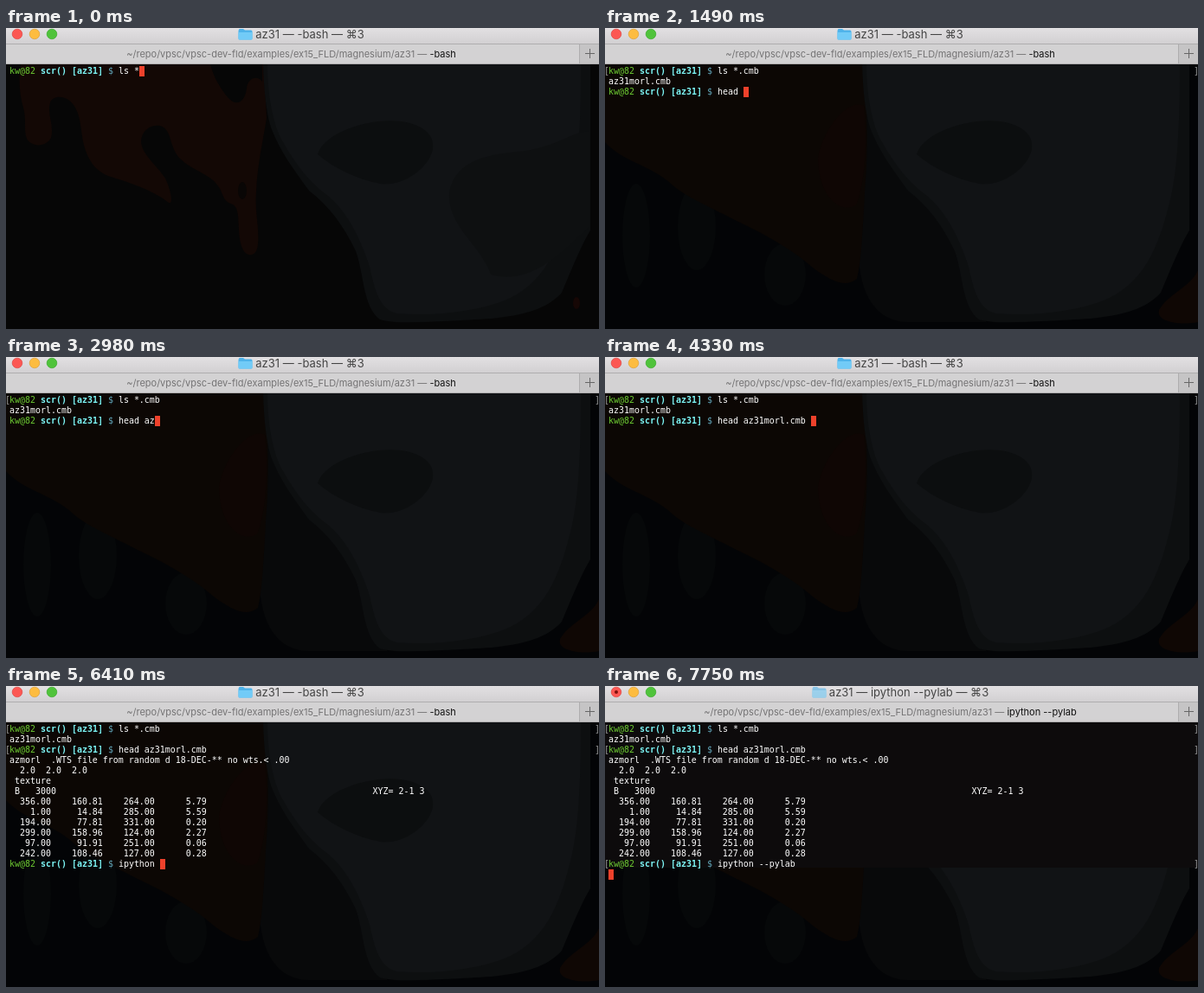
An HTML page for the animation above (8 s loop, 685 by 348 pixels).

```html
<!DOCTYPE html>
<html lang="en">
<head>
<meta charset="utf-8">
<title>Terminal session</title>
<style>
html, body { margin: 0; width: 100%; height: 100%; overflow: hidden; background: #060606; }
#stage { position: relative; width: 685px; height: 348px; overflow: hidden; }
svg { position: absolute; left: 0; top: 0; }
svg text { font-family: Inter, "Noto Sans", "DejaVu Sans", sans-serif; text-anchor: middle; white-space: pre; }
.row {
  position: absolute; left: -2px; height: 12px; margin: 0; white-space: pre;
  font: 9.966px/12px "DejaVu Sans Mono", monospace; color: #fff;
}
.user { color: #6cc932; }
.dir { color: #7df6f6; font-weight: bold; }
.sign { color: #63a9bd; }
.open, .close { color: #a2a2a2; }
.open { position: relative; left: 1px; }
.close { position: absolute; left: 682px; }
#cursor { position: absolute; width: 6px; height: 12px; background: #ee412b; }
</style>
</head>
<body>
<div id="stage">
  <svg width="685" height="348" viewBox="0 0 685 348">
    <defs>
      <linearGradient id="bar" x1="0" y1="0" x2="0" y2="1">
        <stop offset="0" stop-color="#e2e0e2"/>
        <stop offset="1" stop-color="#d2d0d2"/>
      </linearGradient>
      <g id="skull">
        <path fill="#0d0f10" d="M297 42C298 70 300 96 306 115C316 142 334 166 350 188C374 206 392 232 404 258C414 286 412 322 432 337C450 344 520 338 560 336C600 332 626 324 642 306C652 282 664 252 675 234V42Z"/>
        <path fill="#111315" d="M302 42C302 76 308 112 320 132C336 160 352 180 372 194C396 214 410 246 420 276C426 304 432 326 452 330C500 334 560 326 590 308C624 288 640 250 650 210C660 176 664 130 664 42Z"/>
        <path fill="#0c0e0f" d="M360 146C366 126 398 112 430 108C470 104 496 118 493 140C488 164 456 184 432 180C402 174 376 160 360 146Z"/>
      </g>
    </defs>

    <g id="wallA">
      <rect width="685" height="348" fill="#060606"/>
      <path fill="#130805" d="M17 42C14 62 16 78 20 92C24 106 20 118 24 128C30 138 46 138 52 127C56 112 47 100 51 86C55 76 73 78 80 92C88 106 86 126 92 142C98 158 106 166 118 171C140 178 168 186 188 202C194 204 190 186 184 174C174 158 158 148 156 132C156 118 168 111 178 113C192 117 188 136 200 150C216 166 236 168 246 184C252 194 250 200 262 204C272 210 266 232 272 252C276 266 290 266 291 250C293 232 287 212 289 190C290 160 297 130 301 104C300 76 298 60 297 42Z"/>
      <path fill="#060606" d="M236 42C240 58 248 70 256 80C266 92 276 86 278 70C279 58 290 54 296 62V42Z"/>
      <ellipse cx="273" cy="188" rx="5" ry="10" fill="#090605"/>
      <use href="#skull"/>
      <path fill="#0e1011" d="M512 190C520 150 560 146 600 142C640 136 656 118 674 120V230C650 250 610 300 560 285C548 250 510 230 512 190Z"/>
      <ellipse cx="659" cy="318" rx="4" ry="7" fill="#160705"/>
    </g>

    <g id="wallB">
      <rect width="685" height="348" fill="#030406"/>
      <g fill="#060809">
        <ellipse cx="36" cy="240" rx="16" ry="60"/>
        <ellipse cx="106" cy="230" rx="22" ry="50"/>
        <ellipse cx="208" cy="285" rx="24" ry="36"/>
      </g>
      <path fill="#08090a" d="M297 42C304 100 300 190 294 240C288 300 310 340 350 340H440L420 190Z"/>
      <path fill="#0c0704" d="M0 42H297C304 90 304 140 300 190C298 230 296 270 291 290C276 302 258 290 240 277C214 254 180 236 150 222C116 204 90 194 74 178C50 158 20 154 0 132Z"/>
      <path fill="#0f0604" d="M246 150C250 120 280 80 299 90C304 130 300 180 290 205C268 216 246 190 246 150Z"/>
      <use href="#skull"/>
      <path fill="#0f0704" d="M685 280C676 300 652 306 640 326C636 340 664 344 685 340Z"/>
    </g>
    <rect id="flat" y="42" width="685" height="168" fill="#0d0b0c"/>

    <rect width="685" height="18" fill="url(#bar)"/>
    <rect y="18" width="685" height="24" fill="#d3d2d3"/>
    <rect x="663" y="19" width="22" height="22" fill="#c5c4c5"/>
    <path d="M0 18.5H685M662.5 18V42M0 41.5H685" stroke="#aeadae" fill="none"/>
    <path d="M669 29.5H680M674.5 24V35" stroke="#666" fill="none"/>
    <g stroke-width=".7">
      <circle cx="13" cy="7" r="5.8" fill="#fc5753" stroke="#df4744"/>
      <circle cx="33" cy="7" r="5.8" fill="#fdbc40" stroke="#de9f34"/>
      <circle cx="53" cy="7" r="5.8" fill="#50c33b" stroke="#3aa92c"/>
    </g>
    <circle id="dirty" cx="13" cy="7" r="2" fill="#7d100c"/>
    <g id="folder">
      <path d="M1 2Q1 1 2 1H6L8 2.5H15Q16.500 2.500 16.500 4V12Q16.500 13.500 15 13.500H2Q.5 13.500 .5 12V3Z" fill="#4fb3ea"/>
      <path d="M.5 5H16.500V12Q16.500 13.500 15 13.500H2Q.5 13.500 .5 12Z" fill="#72cbf7"/>
    </g>
    <text id="title" x="351" y="12" font-size="13" fill="#444"></text>
    <text x="329.5" y="34" font-size="11" fill="#747374">~/repo/vpsc/vpsc-dev-fld/examples/ex15_FLD/magnesium/az31 — <tspan id="job" fill="#111"></tspan></text>
  </svg>
  <div id="term"></div>
  <div id="cursor"></div>
</div>
<script>
const LOOP = 8000, PROMPT_COLS = 21;
const $ = id => document.getElementById(id);

const FILE = 'az31morl.cmb';
const COMMANDS = ['ls *.cmb', 'head ' + FILE, 'ipython --pylab'];
const DATA = [
  [356, 160.81, 264, 5.79], [1, 14.84, 285, 5.59], [194, 77.81, 331, 0.2],
  [299, 158.96, 124, 2.27], [97, 91.91, 251, 0.06], [242, 108.46, 127, 0.28]
];
const OUTPUT = [
  [FILE],
  [
    'azmorl  .WTS file from random d 18-DEC-** no wts.< .00',
    '  2.0  2.0  2.0',
    ' texture',
    ' B   3000'.padEnd(70) + 'XYZ= 2-1 3',
    ...DATA.map(r => r.map((v, i) => v.toFixed(2).padStart(i ? 10 : 8)).join(''))
  ],
  []
];

// [start ms, commands already run, text typed so far]
const STEPS = [
  [0, 0, 'ls *'], [150, 0, 'ls *.c'], [300, 0, 'ls *.cmb'],
  [450, 1, ''], [1050, 1, 'h'], [1200, 1, 'hea'], [1350, 1, 'head'],
  [1490, 1, 'head '], [1640, 1, 'head a'], [1790, 1, 'head az'],
  [2090, 1, 'head az3'], [2240, 1, 'head az31'],
  [2830, 1, 'head az3'], [2980, 1, 'head az'],
  [3880, 1, 'head az3'], [4030, 1, 'head az31'], [4330, 1, `head ${FILE} `],
  [5080, 2, ''], [5820, 2, 'i'], [5970, 2, 'ip'], [6120, 2, 'ipyt'],
  [6260, 2, 'ipython'], [6410, 2, 'ipython '], [6560, 2, 'ipython --'],
  [6860, 2, 'ipython --p'], [7010, 2, 'ipython --py'],
  [7160, 2, 'ipython --pyla'], [7310, 2, 'ipython --pylab'],
  [7600, 3, ''], [7750, 3, '']
];

const span = (cls, text) => `<span class="${cls}">${text}</span>`;
const plain = text => ' ' + text.replace(/</g, '&lt;');

function prompt(text, done) {
  return (done ? span('open', '[') : ' ') + span('user', 'kw@82') + ' ' +
    span('dir', 'scr()') + ' ' + span('dir', '[az31]') + ' ' + span('sign', '$') + ' ' +
    text + (done ? span('close', ']') : '');
}

function show(id, on) { $(id).style.display = on ? '' : 'none'; }

function draw([start, run, typed]) {
  const rows = [];
  for (let i = 0; i < run; i++) rows.push(prompt(COMMANDS[i], true), ...OUTPUT[i].map(plain));
  const busy = run === COMMANDS.length;
  const cursorRow = rows.length;
  if (!busy) rows.push(prompt(typed, false));
  $('term').innerHTML = rows
    .map((r, i) => `<div class="row" style="top:${44 + 12 * i}px">${r}</div>`).join('');
  $('cursor').style.left = 4 + 6 * (busy ? 0 : PROMPT_COLS + typed.length) + 'px';
  $('cursor').style.top = 44 + 12 * cursorRow + 'px';

  const renamed = start >= 7750;
  const job = renamed ? 'ipython --pylab' : '-bash';
  $('title').textContent = `az31 — ${job} — ⌘3`;
  $('job').textContent = job;
  $('folder').setAttribute('transform', `translate(${renamed ? 239 : 268} 0)`);
  $('folder').setAttribute('opacity', renamed ? .6 : 1);
  show('dirty', renamed);
  show('wallB', run > 0);
  show('flat', renamed);
}

let current = -1;
function tick() {
  const t = performance.now() % LOOP;
  const index = STEPS.filter(s => s[0] <= t).length - 1;
  if (index !== current) draw(STEPS[current = index]);
  requestAnimationFrame(tick);
}
tick();
</script>
</body>
</html>
```
